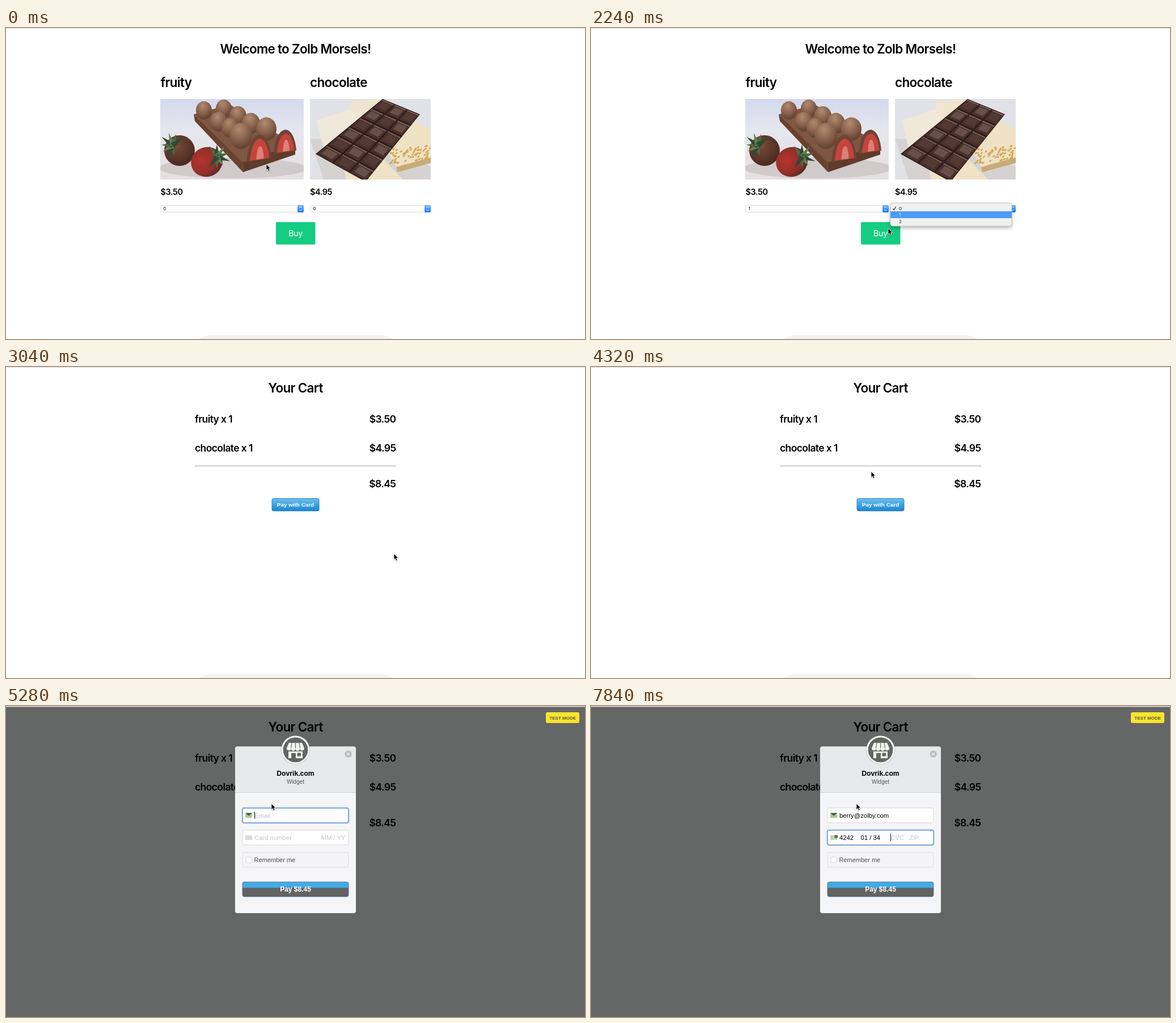
Recreate the animation shown at these times as an HTML page. Size 1021 by 548 pixels, loop 8000 ms.

```html
<!DOCTYPE html>
<html lang="en">
<head>
<meta charset="utf-8">
<title>Sweet shop checkout</title>
<style>
html, body { margin: 0; width: 100%; height: 100%; overflow: hidden; background: #fff; }
svg { display: block; }
text { font-family: Inter, Roboto, sans-serif; white-space: pre; }
.h { font-size: 22.5px; font-weight: 600; letter-spacing: -.7px; }
.price { font-size: 14.5px; font-weight: 600; letter-spacing: -.45px; }
.line { font-size: 17.5px; font-weight: 600; letter-spacing: -.6px; }
.opt { font-size: 8px; }
.buy { font-size: 14.5px; letter-spacing: -.4px; fill: #fff; }
.f { font: 11.3px "Liberation Sans", Arial, sans-serif; }
.b { font: bold 12px "Liberation Sans", Arial, sans-serif; }
.hint { fill: #c4c4c8; }
.mid { text-anchor: middle; }
.end { text-anchor: end; }
</style>
</head>
<body>
<svg id="stage" width="1021" height="548" viewBox="0 0 1021 548">
  <defs>
    <radialGradient id="egg" cx=".42" cy=".25" r=".8"><stop stop-color="#b28a70"/><stop offset=".55" stop-color="#86604b"/><stop offset="1" stop-color="#5b3a2b"/></radialGradient>
    <radialGradient id="choc" cx=".4" cy=".35" r=".7"><stop stop-color="#7a4a38"/><stop offset="1" stop-color="#452820"/></radialGradient>
    <radialGradient id="berry" cx=".35" cy=".4" r=".7"><stop stop-color="#b8322c"/><stop offset=".6" stop-color="#93302a"/><stop offset="1" stop-color="#4f2a22"/></radialGradient>
    <linearGradient id="sky" x2="0" y2="1"><stop stop-color="#d3daec"/><stop offset=".4" stop-color="#e6e6ee"/><stop offset="1" stop-color="#e4dfe0"/></linearGradient>
    <linearGradient id="knob" x2="0" y2="1"><stop stop-color="#6fb5fa"/><stop offset="1" stop-color="#1776f5"/></linearGradient>
    <linearGradient id="pay" x2="0" y2="1"><stop stop-color="#6fc0ee"/><stop offset=".5" stop-color="#3da4e2"/><stop offset="1" stop-color="#1a86d0"/></linearGradient>
    <filter id="soft" x="-20%" y="-60%" width="140%" height="240%"><feDropShadow dx="0" dy="3" stdDeviation="3" flood-opacity=".3"/></filter>
    <filter id="drop" x="-50%" y="-50%" width="200%" height="200%"><feDropShadow dx="0" dy="1" stdDeviation=".8" flood-opacity=".35"/></filter>
  </defs>
  <rect width="1021" height="548" fill="#fff"/>
  <rect id="pill" x="324" y="541" width="374" height="80" rx="38" fill="#f3f3f3"/>

  <g id="shop">
    <text class="h mid" x="510.5" y="45">Welcome to Zolb Morsels!</text>
    <text class="h" x="272.5" y="103.5">fruity</text>
    <text class="h" x="536" y="103.5">chocolate</text>
    <svg id="fruity" x="272" y="125" width="253" height="142" viewBox="272 125 253 142"></svg>
    <svg id="bar" x="536" y="125" width="213" height="142" viewBox="536 125 213 142"></svg>
    <text class="price" x="272.5" y="294">$3.50</text>
    <text class="price" x="536" y="294">$4.95</text>
    <g id="selects"></g>
    <rect x="476" y="342" width="69.5" height="39.5" rx="2" fill="#15cd82"/>
    <text class="buy mid" x="510.5" y="367">Buy</text>
    <g id="menu" filter="url(#soft)">
      <rect id="menuBox" y="308.5" height="40.5" rx="4" fill="#f0f0f0" stroke="#b9b9b9" stroke-width=".8"/>
      <rect id="menuBar" y="323" height="12" fill="#4b9bf9"/>
      <g id="menuText"></g>
    </g>
  </g>

  <g id="cart">
    <rect id="veil" y="1" width="1021" height="547" fill="#656766"/>
    <text class="h mid" x="510.5" y="45">Your Cart</text>
    <text class="line" x="333" y="98">fruity x 1</text>
    <text class="line end" x="687.5" y="98">$3.50</text>
    <text class="line" x="333" y="149">chocolate x 1</text>
    <text class="line end" x="687.5" y="149">$4.95</text>
    <text class="line end" x="687.5" y="212">$8.45</text>
    <g id="payLink">
      <path d="M333 174.3H688" stroke="#b5b5b5" stroke-width="1.3"/>
      <rect x="469" y="231.7" width="83" height="22" rx="3" fill="url(#pay)" stroke="#2473ad" stroke-width=".9"/>
      <text class="b mid" x="510.5" y="246" fill="#fff" style="font-size:9.9px">Pay with Card</text>
    </g>
  </g>

  <g id="modal">
    <rect x="952" y="11" width="59" height="19" rx="3" fill="#f8e32e"/>
    <text class="b mid" x="981.7" y="23.6" fill="#5d5a35" style="font-size:8px">TEST MODE</text>
    <g id="card">
      <rect x="404" y="71.5" width="213" height="293.5" rx="4" fill="#f5f5f7"/>
      <path d="M404 152.5V75.5a4 4 0 0 1 4-4H613a4 4 0 0 1 4 4V152.5Z" fill="#e8e9ea"/>
      <path d="M404 152.5H617" stroke="#d2d3d5"/>
      <circle cx="510.5" cy="77.5" r="25.3" fill="#bbb"/>
      <circle cx="510.5" cy="77.3" r="24.6" fill="#fff"/>
      <circle cx="510.5" cy="77.3" r="22" fill="#646664"/>
      <path d="M499 65H522L526 74a3.8 3.8 0 0 1-7.7 1a3.8 3.8 0 0 1-7.8 0a3.8 3.8 0 0 1-7.8 0a3.8 3.8 0 0 1-7.7-1ZM498 80H523V92H511V83H503V92H498Z" fill="#f2f4ef"/>
      <path d="M504 65l-1.6 9M510.5 65v9M517 65l1.6 9" stroke="#646664" stroke-width="1.2"/>
      <rect x="513.5" y="82.5" width="6.5" height="6" fill="#646664"/>
      <circle cx="603.5" cy="84.7" r="6.2" fill="#bcbdbf"/>
      <path d="M601.2 82.4l4.6 4.6m0-4.6l-4.6 4.6" stroke="#f0f0f1" stroke-width="1.4"/>
      <text class="b mid" x="510.5" y="122.7" style="font-size:12.2px">Dovrik.com</text>
      <text class="f mid" x="510.5" y="137" fill="#555" style="font-size:10px">Widget</text>
      <rect x="417" y="179.8" width="187" height="26" rx="3" fill="#fff" stroke="#d9d9dc"/>
      <rect x="417" y="218.8" width="187" height="26" rx="3" fill="#fff" stroke="#d9d9dc"/>
      <g id="focus" fill="none">
        <rect x="416.5" y="179.3" width="188" height="27" rx="3.5" stroke="#8fb8ef" stroke-width="3" opacity=".4"/>
        <rect x="417" y="179.8" width="187" height="26" rx="3" stroke="#6594d2" stroke-width="1.2"/>
      </g>
      <rect x="422" y="188.5" width="12" height="8.5" rx="1" fill="#a9c79a"/>
      <path d="M422 188.5h12l-6 5z" fill="#46583f"/>
      <rect x="422" y="228" width="12" height="8" rx="1" fill="#d6d6d9"/>
      <path d="M422 230h12M423.5 233.7h4" stroke="#f2f2f3"/>
      <g id="chip"><rect x="422" y="228" width="12" height="8" rx="1" fill="#bdd3b3"/><circle cx="432.3" cy="230" r="3" fill="#4d7a49"/></g>
      <text class="f" id="email" x="438" y="196.5"></text>
      <text class="f" id="number" x="438" y="235.5"></text>
      <text class="f" id="expiry" y="235.5"></text>
      <text class="f hint" id="extra" x="528" y="235.5">CVC   ZIP</text>
      <rect id="caret" width="1" height="13" fill="#222"/>
      <rect x="417" y="258" width="187" height="26" rx="3" fill="#f4f4f6" stroke="#dedee1"/>
      <rect x="423" y="266" width="10" height="10" rx="2" fill="#fff" stroke="#cfcfd3" stroke-width=".9"/>
      <text class="f" x="437.5" y="275.3" fill="#4c4c4e" style="font-size:11px">Remember me</text>
      <rect x="417" y="310" width="187" height="26" rx="3" fill="#626463"/>
      <path d="M417 320.2V313a3 3 0 0 1 3-3H601a3 3 0 0 1 3 3V320.2Z" fill="#43aae6"/>
      <rect x="417" y="310" width="187" height="26" rx="3" fill="none" stroke="#4b7393" stroke-width=".8"/>
      <text class="b mid" x="510.5" y="327.2" fill="#fff">Pay $8.45</text>
    </g>
  </g>

  <rect width="1021" height="1.5" fill="#e3e3e3"/>
  <path id="arrow" d="M0 0V10.6l2.4-2.2 1.7 3.9 2-.8-1.7-3.8h3.3z" fill="#000" stroke="#fff" stroke-width=".8" filter="url(#drop)"/>
  <path id="beam" d="M-2.5-5.5q2 0 2.5 1.2q.5-1.2 2.5-1.2M0-4.5V4.5M-2.5 5.5q2 0 2.5-1.2q.5 1.2 2.5 1.2" fill="none" stroke="#111"/>
</svg>
<script>
const $ = id => document.getElementById(id);
const show = (id, on) => $(id).setAttribute('visibility', on ? 'visible' : 'hidden');
const set = (id, attrs) => { for (const k in attrs) $(id).setAttribute(k, attrs[k]); };
const poly = (pts, fill) => `<polygon points="${pts}" fill="${fill}"/>`;
const oval = (x, y, rx, ry, fill, turn = 0) =>
  `<ellipse cx="${x}" cy="${y}" rx="${rx}" ry="${ry}" fill="${fill}" transform="rotate(${turn} ${x} ${y})"/>`;
const arch = (x, y, w, h, fill) =>
  `<path d="M${x - w} ${y}C${x - w * .8} ${y - h * 1.3} ${x + w * .8} ${y - h * 1.3} ${x + w} ${y - w * .3}Z" fill="${fill}"/>`;
let seed = 7;
const rnd = () => (seed = seed * 16807 % 2147483647) / 2147483647;

function leaves(x, y, size, from, to) {
  let out = '';
  for (let i = 0; i < 8; i++) {
    const a = from + (to - from) * i / 7, c = Math.cos(a), s = Math.sin(a), l = size * (.75 + rnd() * .4);
    out += poly([x - s * 5, y + c * 5, x + c * l, y + s * l, x + s * 5, y - c * 5], ['#4d6b42', '#2f4a33', '#667f52'][i % 3]);
  }
  return out;
}

function fruityPhoto() {
  let out = '<rect x="272" y="125" width="253" height="142" fill="url(#sky)"/>';
  out += oval(400, 247, 130, 18, '#d0cacb');
  out += poly('331,152 395,135 510,206 417,240', '#7f5641');
  out += poly('331,152 417,237 418,254 333,164', '#68412f') + poly('417,237 510,205 510,223 418,254', '#5f3b2b');
  for (const [x, y, r] of [[384, 142, 14], [349, 145, 14], [409, 155, 15], [375, 165, 15], [432, 168, 16], [395, 176, 15], [459, 178, 18], [414, 190, 20]])
    out += oval(x, y, r, r * 1.15, 'url(#egg)');
  for (const [x, y, w, h] of [[492, 222, 20, 43], [446, 236, 22, 48]])
    out += arch(x, y, w, h, '#6d4533') + arch(x + 1, y - 2, w - 5, h - 9, '#c5443d') + arch(x + 2, y - 4, w * .3, h * .5, '#dc8078');
  out += oval(306, 216, 27, 27, 'url(#choc)') + leaves(294, 207, 24, 1.4, 5.6);
  return out + oval(354, 236, 28, 26, 'url(#berry)', -20) + leaves(372, 227, 23, -2.2, 2.2);
}

function barPhoto() {
  let out = '<rect x="536" y="125" width="213" height="142" fill="#e1e2e8"/>';
  out += poly('536,195 560,267 749,267 749,245 690,200', '#d6d2d2');
  out += poly('609,130 660,125 690,150 600,190', '#efe5cf');
  out += poly('548,163 607,143 640,190 560,212', '#f0e8d8') + poly('590,225 650,215 700,267 600,267', '#efe2c6');
  out += poly('712,160 749,178 749,232 688,245 664,205', '#efe1c4') + poly('688,245 749,228 749,238 690,254', '#c9ab78');
  for (let i = 0; i < 65; i++) {
    const u = rnd(), v = rnd();
    out += oval(678 + u * 70, 214 + v * 26 - u * 8, 2.6, 1.4, '#d3a95b', -40);
  }
  const at = (u, v) => {
    const mix = (a, b, c, d) => (a * (1 - u) + b * u) * (1 - v) + (c * (1 - u) + d * u) * v;
    return [mix(664, 730, 546, 634), mix(125, 152, 222, 271)];
  };
  const quad = (u, v, du, dv) => [at(u, v), at(u + du, v), at(u + du, v + dv), at(u, v + dv)].join(' ');
  out += poly(quad(0, 0, 1, 1), '#2e1d1b');
  for (let r = 0; r < 6; r++) for (let c = 0; c < 3; c++) {
    const u = c / 3, v = r / 6;
    out += poly(quad(u + .02, v + .01, .3, .145), '#4a312b') + poly(quad(u + .065, v + .035, .21, .09), (r + c) % 2 ? '#675049' : '#533a34');
    out += poly(quad(u + .02, v + .01, .3, .014), '#796059');
  }
  return out;
}

const select = (x, end, id) => `
  <rect x="${x + .5}" y="312.5" width="${end - x - 1}" height="12" rx="3" fill="#fff" stroke="#d6d6d6" stroke-width=".9"/>
  <rect x="${end - 11}" y="312" width="11" height="13" rx="2.5" fill="url(#knob)"/>
  <path d="M${end - 7.7} 317l2.2-2.2 2.2 2.2m-4.4 3l2.2 2.2 2.2-2.2" fill="none" stroke="#fff"/>
  <text class="opt" id="${id}" x="${x + 5.5}" y="321.3">0</text>`;

$('fruity').innerHTML = fruityPhoto();
$('bar').innerHTML = barPhoto();
$('selects').innerHTML = select(272, 525, 'qty1') + select(536, 749, 'qty2');
$('menuText').innerHTML = '<path d="M4.5 318l1.8 2.6 3.4-6" fill="none" stroke="#222" stroke-width="1.1"/>' +
  [0, 1, 2].map(i => `<text class="opt" id="item${i}" x="15" y="${320.6 + i * 11.5}">${i}</text>`).join('');

// time, x, y
const path = [[0, 459, 240], [160, 457, 252], [480, 432, 318], [640, 432, 318], [960, 430, 330], [1120, 430, 330],
  [1600, 568, 319], [1760, 566, 319], [2080, 548, 330], [2240, 524, 353], [2400, 514, 361], [2640, 514, 361],
  [3040, 684, 329], [3360, 676, 322], [3840, 515, 243], [4080, 512, 241], [4320, 494, 184], [4480, 489, 177],
  [4800, 468, 172], [8000, 468, 172]];

function pointer(t) {
  const i = path.findIndex(p => p[0] > t), [t0, x0, y0] = path[i - 1], [t1, x1, y1] = path[i];
  const k = (t - t0) / (t1 - t0);
  return [x0 + (x1 - x0) * k, y0 + (y1 - y0) * k];
}

function write(id, value, hint) {
  $(id).textContent = value || hint;
  $(id).classList.toggle('hint', !value);
  return value ? $(id).getComputedTextLength() : 0;
}

const clamp = (v, max) => Math.max(0, Math.min(max, Math.round(v)));

function menu(t) {
  const first = t >= 640 && t < 1280, open = first || t >= 1760 && t < 2400;
  show('menu', open);
  const x = first ? 264 : 528, width = first ? 254 : 214, hot = t >= (first ? 960 : 2080) ? 1 : 0;
  set('menuBox', { x, width });
  set('menuBar', { x, width, y: 311.5 + hot * 11.5 });
  set('menuText', { transform: `translate(${x})` });
  for (let i = 0; i < 3; i++) set('item' + i, { fill: i === hot ? '#fff' : '#222' });
  $('qty1').textContent = t >= 1280 ? 1 : 0;
  $('qty2').textContent = t >= 2400 ? 1 : 0;
}

function form(t) {
  const onCard = t >= 6880, folded = t >= 7520;
  const mail = 'berry@zolby.com'.slice(0, clamp((t - 5760) / 57, 15));
  const digits = '4242'.repeat(4).slice(0, clamp((t - 6880) / 30, 16));
  const date = '01 / 34'.slice(0, clamp((t - 7360) / 64, 7));
  const mailEnd = 438 + write('email', mail, 'Email');
  const cardEnd = 438 + write('number', folded ? '4242' : digits.replace(/(.{4})(?=.)/g, '$1 '), 'Card number');
  set('expiry', { x: folded ? 475.5 : 555.5 });
  const dateEnd = 475.5 + write('expiry', date, 'MM / YY');
  set('focus', { transform: `translate(0 ${onCard ? 39 : 0})` });
  set('caret', { x: !onCard ? mailEnd : !folded ? cardEnd : t >= 7840 ? 528 : dateEnd, y: onCard ? 225 : 186 });
  set('card', { transform: `translate(0 ${t < 4640 ? -2 : 0})` });
  $('extra').style.display = folded ? '' : 'none';
  $('chip').style.display = digits ? '' : 'none';
}

function draw(now) {
  const t = Math.floor(now % 8000 / 160) * 160, cart = t >= 2880, paying = t >= 4480;
  $('shop').style.display = cart ? 'none' : '';
  $('cart').style.display = cart ? '' : 'none';
  $('modal').style.display = paying ? '' : 'none';
  show('payLink', !paying);
  show('veil', paying);
  show('pill', !paying);
  if (!cart) menu(t);
  if (paying) form(t);
  const beam = t === 4480, [x, y] = pointer(t);
  show('arrow', !beam);
  show('beam', beam);
  set(beam ? 'beam' : 'arrow', { transform: `translate(${x} ${y})` });
}

const start = performance.now();
function loop() {
  draw(performance.now() - start);
  requestAnimationFrame(loop);
}
loop();
</script>
</body>
</html>
```
